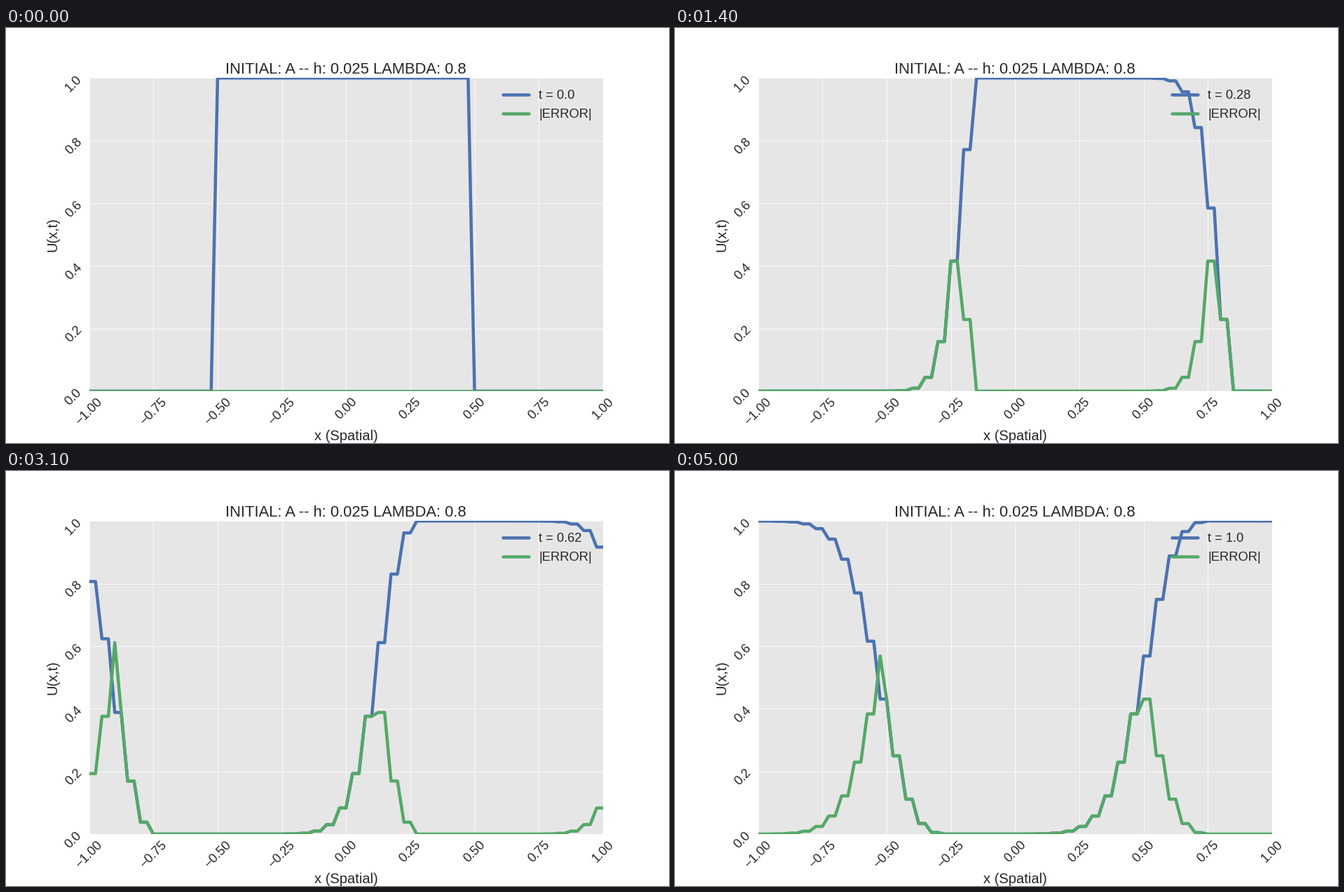
Write a matplotlib script that moves like this. It is 946 px wide and 592 px high and loops after 5.1 s.

```python
import numpy as np
import matplotlib.pyplot as plt
from matplotlib.animation import FuncAnimation
from matplotlib.lines import Line2D

W, H, DPI = 946, 592, 72
STEPS = 51
CELLS = 81            # grid points on [-1, 1], h = 0.025
LAM = 0.8             # dt / h, so dt = 0.02
BLUE, GREEN, INK = "#4C72B0", "#55A868", "#262626"
LINE_WIDTH = 4.5

plt.rcParams.update({
    "font.family": "Liberation Sans",
    "text.color": INK,
    "axes.labelcolor": INK,
    "lines.solid_capstyle": "round",
    "lines.solid_joinstyle": "round",
})

cell = np.arange(CELLS)
x = (cell - 40) / 40


def exact(step):
    """Box on [-0.5, 0.5) moved right with period 2, in units of 0.005."""
    pos = (5 * cell - 4 * step) % 400 - 200
    return ((pos >= -100) & (pos < 100)).astype(float)


def solve():
    """Lax-Friedrichs solution of u_t + u_x = 0 on a closed ring of cells."""
    u = exact(0)
    rows = [u]
    for _ in range(STEPS - 1):
        left, right = np.roll(u, 1), np.roll(u, -1)
        u = (1 + LAM) / 2 * left + (1 - LAM) / 2 * right
        rows.append(u)
    return rows


solution = solve()

fig = plt.figure(figsize=(W / DPI, H / DPI), dpi=DPI, facecolor="white")
left, right, top, bottom = 118.55, 851.9, 71.3, 518
ax = fig.add_axes([left / W, 1 - bottom / H, (right - left) / W, (bottom - top) / H],
                  facecolor="#E6E6E6")
ax.set(xlim=(-1, 1), ylim=(0, 1),
       xticks=np.linspace(-1, 1, 9), yticks=np.linspace(0, 1, 6))
ax.set_axisbelow(True)
ax.grid(color="white", linewidth=0.8)
ax.spines[:].set_visible(False)
ax.tick_params(length=0, pad=7, labelsize=18.33, labelcolor=INK, labelrotation=45)
ax.set_title("INITIAL: A -- h: 0.025 LAMBDA: 0.8", fontsize=22.05, pad=6)
ax.set_xlabel("x (Spatial)", fontsize=20.17, labelpad=3)
ax.set_ylabel("U(x,t)", fontsize=20.17, labelpad=4.5)

wave, = ax.plot(x, solution[0], color=BLUE, linewidth=LINE_WIDTH)
error, = ax.plot(x, 0 * x, color=GREEN, linewidth=LINE_WIDTH)


def legend_row(y, color, text):
    """Frameless legend entry, centred on pixel row y."""
    fig.add_artist(Line2D([709.3 / W, 745.7 / W], [1 - y / H] * 2,
                          color=color, linewidth=LINE_WIDTH))
    return fig.text(760 / W, 1 - (y + 6) / H, text, fontsize=18.33, va="baseline")


time_label = legend_row(95, BLUE, "t = 0.0")
legend_row(122, GREEN, "|ERROR|")


def draw(step):
    u = solution[step]
    wave.set_ydata(u)
    error.set_ydata(np.abs(u - exact(step)))
    time_label.set_text(f"t = {round(step / 50, 2)}")
    return wave, error, time_label


anim = FuncAnimation(fig, draw, frames=STEPS, interval=100, repeat=True, repeat_delay=0)
plt.show()
```
